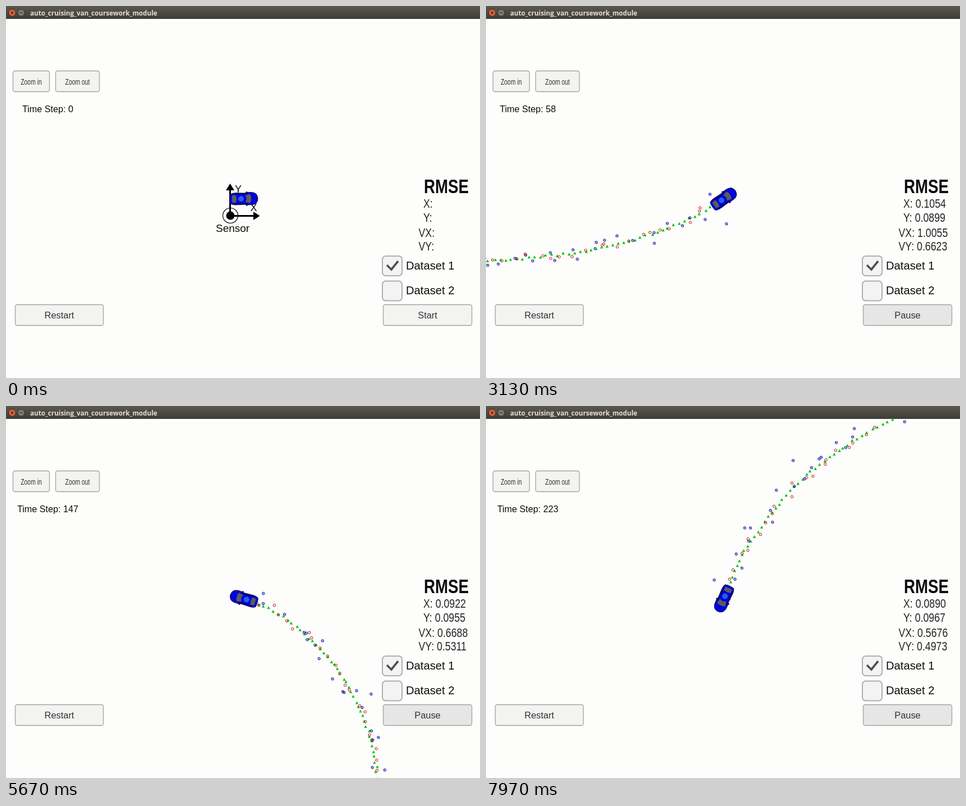
An HTML page with a canvas for the animation above (8 s loop, 845 by 662 pixels).

```html
<!DOCTYPE html>
<html lang="en">
<head>
<meta charset="utf-8">
<title>Tracking simulator</title>
<style>
  html, body { margin: 0; width: 845px; height: 662px; overflow: hidden; background: #fdfdfb; }
  canvas { display: block; }
</style>
</head>
<body>
<canvas id="stage" width="845" height="662"></canvas>
<script>
const ctx = document.getElementById('stage').getContext('2d');
const LOOP = 8000, FRAME = 1000 / 30, STEPS = 224;
const CAR = { x: 424, y: 343 };
const SANS = '"Liberation Sans", Arial, sans-serif';

// Key points of the driven figure, relative to the sensor
const route = [
  { step: 0, x: 24, y: -30 }, { step: 21, x: 241, y: -36 }, { step: 40, x: 431, y: -67 },
  { step: 58, x: 599, y: -142 }, { step: 78, x: 734, y: -281 }, { step: 96, x: 797, y: -440 },
  { step: 113, x: 778, y: -596 }, { step: 130, x: 697, y: -734 }, { step: 147, x: 560, y: -823 },
  { step: 170, x: 339, y: -834 }, { step: 195, x: 119, y: -717 }, { step: 213, x: -1, y: -578 },
  { step: 223, x: -44, y: -484 }];

// Cubic Hermite curve through the key points
function routeAt(step) {
  const last = route.length - 1;
  let i = 0;
  while (i < last - 1 && step >= route[i + 1].step) i++;
  const from = route[i], to = route[i + 1];
  const span = to.step - from.step, u = (step - from.step) / span, v = 1 - u;
  const along = axis => {
    const slope = k => {
      const a = route[Math.max(k - 1, 0)], b = route[Math.min(k + 1, last)];
      return (b[axis] - a[axis]) / (b.step - a.step);
    };
    return v * v * (1 + 2 * u) * from[axis] + u * u * (3 - 2 * u) * to[axis]
      + u * v * span * (v * slope(i) - u * slope(i + 1));
  };
  return { x: along('x'), y: along('y') };
}

// The run starts at 1.4 s, hangs briefly at 1.73 s, then slows a little as it goes on
function stepAt(time) {
  const run = Math.max(0, Math.min(time - 1400, Math.max(330, time - 1550))) / 1000;
  return Math.floor(37 * run - .345 * run * run + .55);
}

function random(seed) {
  const v = Math.sin(seed * 127.1 + 11.7) * 43758.5453;
  return v - Math.floor(v);
}
const gauss = seed => (random(seed) + random(seed + .31) + random(seed + .67) - 1.5) * 2;

// One estimate per step; lidar and radar readings take turns
const marks = Array.from({ length: STEPS }, (_, i) => {
  const p = routeAt(i), radar = i % 2 === 1;
  const estimate = { x: p.x + gauss(i + 300), y: p.y + gauss(i + 600) };
  let reading = { x: p.x + 5 * gauss(i + 900), y: p.y + 5 * gauss(i + 1200) };
  if (radar) {
    const range = Math.hypot(p.x, p.y) + 11 * gauss(i + 1500);
    const angle = Math.atan2(p.y, p.x) + .03 * gauss(i + 1800);
    reading = { x: range * Math.cos(angle), y: range * Math.sin(angle) };
  }
  return { estimate, reading, radar };
});

function text(str, x, y, size, { color = '#0c0c0c', align = 'left', weight = '', narrow = 1, family = SANS } = {}) {
  ctx.save();
  ctx.translate(x, y);
  ctx.scale(narrow, 1);
  ctx.font = `${weight} ${size}px ${family}`;
  ctx.textAlign = align;
  ctx.fillStyle = color;
  ctx.fillText(str, 0, 0);
  ctx.restore();
}

function polygon(color, ...points) {
  ctx.beginPath();
  points.forEach(([x, y]) => ctx.lineTo(x, y));
  ctx.closePath();
  ctx.fillStyle = color;
  ctx.fill();
}

function line(color, width, ...points) {
  ctx.beginPath();
  points.forEach(([x, y]) => ctx.lineTo(x, y));
  ctx.strokeStyle = color;
  ctx.lineWidth = width;
  ctx.stroke();
}

function circle(x, y, r, fill, stroke, width = 1) {
  ctx.beginPath();
  ctx.arc(x, y, r, 0, 7);
  if (fill) { ctx.fillStyle = fill; ctx.fill(); }
  if (stroke) { ctx.strokeStyle = stroke; ctx.lineWidth = width; ctx.stroke(); }
}

function box(x, y, w, h, r, fill, stroke, width = 1) {
  ctx.beginPath();
  ctx.roundRect(x, y, w, h, r);
  ctx.fillStyle = fill;
  ctx.fill();
  ctx.strokeStyle = stroke;
  ctx.lineWidth = width;
  ctx.stroke();
}

function button(label, x, y, w, size, { narrow = 1, fill = '#f3f3f2' } = {}) {
  box(x + .5, y + .5, w - 1, 37, 3.5, fill, '#a3a3a0', 1.3);
  text(label, x + w / 2, y + 25, size, { color: '#323232', align: 'center', narrow });
}

function drawSensor() {
  line('#000', 3, [-.5, 0], [-.5, -46]);
  line('#000', 3, [0, .5], [42, .5]);
  polygon('#000', [-8, -45], [-.5, -57], [7, -45]);
  polygon('#000', [41, -7], [52.5, .5], [41, 8]);
  circle(0, 0, 13.5, null, '#000', 1.2);
  circle(0, 0, 7.5, '#000');
  text('Y', 8, -41, 18);
  text('X', 35.5, -8, 18);
  text('Sensor', -26, 28.5, 19);
}

function drawMark({ estimate, reading, radar }) {
  const { x, y } = estimate, color = radar ? '#0000a0' : '#c40808';
  polygon('#06c414', [x - 2.7, y + 2.3], [x, y - 2.7], [x + 2.7, y + 2.3]);
  circle(reading.x, reading.y, 2.2, null, color);
  if (radar) line(color, .9, [reading.x - 1.4, reading.y - 1.1], [reading.x + 1.4, reading.y + 1]);
}

function drawCar(heading) {
  ctx.save();
  ctx.translate(CAR.x, CAR.y);
  ctx.rotate(heading);
  for (const side of [-1, 1]) polygon('#0a0a50', [3, side * 9], [4, side * 13], [7, side * 12], [7, side * 9]);
  ctx.beginPath();
  ctx.moveTo(-24, -8);
  ctx.quadraticCurveTo(-20, -11, -12, -10.5);
  ctx.lineTo(2, -10);
  ctx.quadraticCurveTo(16, -13, 22, -8);
  ctx.quadraticCurveTo(28, 0, 22, 8);
  ctx.quadraticCurveTo(16, 13, 2, 10);
  ctx.lineTo(-12, 10.5);
  ctx.quadraticCurveTo(-20, 11, -24, 8);
  ctx.quadraticCurveTo(-26, 0, -24, -8);
  ctx.fillStyle = '#0404dc';
  ctx.fill();
  ctx.strokeStyle = '#06064a';
  ctx.lineWidth = 1;
  ctx.stroke();
  polygon('#5c5c5c', [-21, -6], [-14, -7], [-13, 0], [-14, 7], [-21, 6]);
  polygon('#5c5c5c', [3, -6], [11, -8], [13, -4], [13, 4], [11, 8], [3, 6], [5, 0]);
  for (const side of [-1, 1]) line('#06063c', 1.5, [-17, side * 8.5], [-4, side * 8.5], [7, side * 9]);
  circle(-5, 0, 5, '#2060f0');
  ctx.restore();
}

// Each error settles from an initial part, spread over all steps, to a constant part
function drawErrors(step) {
  const row = (label, x, y, initial, constant) => {
    const value = Math.sqrt(Math.max(0, initial / step + constant));
    text(step ? `${label}: ${value.toFixed(4)}` : label + ':', x, y, 21.5, { color: '#242424', narrow: .825 });
  };
  text('RMSE', 745, 332.5, 35, { weight: 'bold', narrow: .79 });
  row('X', 744, 358.5, .25, .0068);
  row('Y', 744, 384, -.1, .0098);
  row('VX', 735.5, 410.5, 54, .08);
  row('VY', 735.5, 434.5, 15, .18);
}

function drawPanel(step) {
  button('Zoom in', 12, 115, 66, 15.5, { narrow: .67 });
  button('Zoom out', 88, 115, 79, 15.5, { narrow: .67 });
  text('Time Step: ' + step, 74.5, 188.5, 16.2, { align: 'center' });
  drawErrors(step);
  for (const set of [1, 2]) {
    const y = 400 + set * 44.5;
    box(671, y + .5, 35, 35, 6, '#f3f3f4', '#adadb3', 2);
    text('Dataset ' + set, 713, y + 24, 20.2);
  }
  line('#505055', 3.8, [679, 461], [687, 469], [699, 454]);
  button('Restart', 16, 531, 158, 16.4);
  button(step ? 'Pause' : 'Start', 672, 531, 159, 16.4, { fill: step ? '#e6e6e6' : '#f3f3f2' });
}

function drawTitleBar() {
  const shade = ctx.createLinearGradient(0, 0, 0, 23);
  shade.addColorStop(0, '#5b594f');
  shade.addColorStop(1, '#3d3c37');
  ctx.fillStyle = shade;
  ctx.fillRect(0, 0, 845, 23);
  circle(11, 12, 6.2, '#e9633d', '#35302a');
  line('#5a2414', 1.4, [8.8, 9.8], [13.2, 14.2]);
  line('#5a2414', 1.4, [13.2, 9.8], [8.8, 14.2]);
  circle(27, 12, 6, '#807e73', '#35342f');
  line('#3c3b36', 1.4, [24, 12], [30, 12]);
  text('auto_cruising_van_coursework_module', 43, 16.5, 11.7,
    { color: '#e4e0d6', weight: 'bold', family: '"Open Sans", "Noto Sans", sans-serif' });
}

function render(now) {
  const frame = Math.floor((now % LOOP + 5) / FRAME);
  const time = Math.round(frame * FRAME / 10) * 10;
  const step = stepAt(time);
  const car = routeAt(step), back = routeAt(Math.max(step - 2, 0)), ahead = routeAt(step + 2);

  ctx.fillStyle = '#fdfdfb';
  ctx.fillRect(0, 0, 845, 662);
  ctx.save();
  ctx.translate(CAR.x - car.x, CAR.y - car.y);
  drawSensor();
  if (step) marks.slice(0, step + 1).forEach(drawMark);
  ctx.restore();
  drawCar(Math.atan2(ahead.y - back.y, ahead.x - back.x));
  drawPanel(step);
  drawTitleBar();
  requestAnimationFrame(render);
}
requestAnimationFrame(render);
</script>
</body>
</html>
```
